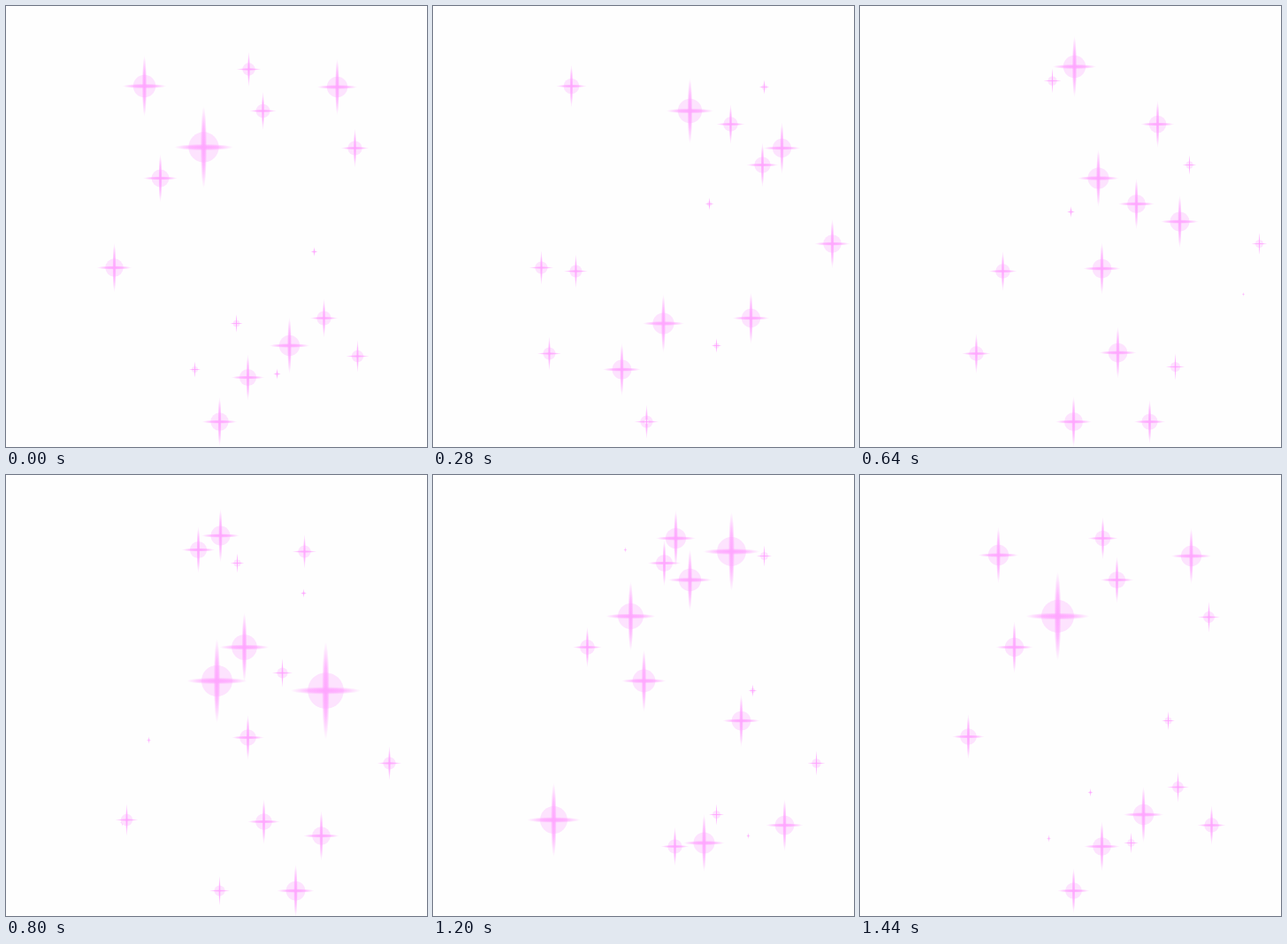
These frames come from a looping animation (476 px wide and 498 px high, 1480 ms). An HTML page without scripts:

```html
<!DOCTYPE html>
<html lang="en">
<head>
<meta charset="utf-8">
<title>Twinkling stars</title>
<style>
  html, body { margin: 0; height: 100%; overflow: hidden; background: #fefefe; }
  svg { display: block; width: 476px; height: 498px; }

  /* --k: turn of the group, 15 turns per loop; --p: half height of a star at its largest */
  use {
    --p: 28;
    animation: twinkle 1480ms calc(var(--k) * 1480ms / 15 - 1750ms) infinite;
  }
  /* half a sine wave, then a rest */
  @keyframes twinkle {
    0% { scale: 0; animation-timing-function: cubic-bezier(.36, .565, .65, 1); }
    24% { scale: calc(var(--p) / 50); animation-timing-function: cubic-bezier(.35, 0, .64, .435); }
    48%, 100% { scale: 0; }
  }
</style>
</head>
<body>
<svg viewBox="-.5 -.5 476 498">
  <defs>
    <radialGradient id="beam">
      <stop offset="0" stop-color="#ffa6ff"/>
      <stop offset=".5" stop-color="#ffa6ff" stop-opacity=".75"/>
      <stop offset="1" stop-color="#ffa6ff" stop-opacity="0"/>
    </radialGradient>
    <g id="star">
      <circle r="19.5" fill="#fde3fe"/>
      <ellipse rx="38" ry="4.2" fill="url(#beam)"/>
      <ellipse rx="4.2" ry="53" fill="url(#beam)"/>
    </g>
  </defs>

  <g style="--k:0">
    <use href="#star" style="translate:156px 90px;--p:35"/>
    <use href="#star" style="translate:122px 295px"/>
    <use href="#star" style="translate:241px 469px"/>
  </g>
  <g style="--k:1">
    <use href="#star" style="translate:394px 160px;--p:30"/>
    <use href="#star" style="translate:359px 352px;--p:30"/>
  </g>
  <g style="--k:2">
    <use href="#star" style="translate:290px 118px;--p:35"/>
    <use href="#star" style="translate:260px 358px;--p:31"/>
    <use href="#star" style="translate:213px 410px"/>
  </g>
  <g style="--k:3">
    <use href="#star" style="translate:372px 179px;--p:26"/>
    <use href="#star" style="translate:451px 268px;--p:29"/>
  </g>
  <g style="--k:4">
    <use href="#star" style="translate:336px 133px;--p:33"/>
    <use href="#star" style="translate:161px 299px"/>
    <use href="#star" style="translate:131px 392px"/>
  </g>
  <g style="--k:5">
    <use href="#star" style="translate:312px 223px"/>
    <use href="#star" style="translate:241px 469px"/>
  </g>
  <g style="--k:6">
    <use href="#star" style="translate:242px 68px;--p:33"/>
    <use href="#star" style="translate:273px 296px"/>
    <use href="#star" style="translate:291px 391px"/>
  </g>
  <g style="--k:7">
    <use href="#star" style="translate:269px 194px;--p:37"/>
    <use href="#star" style="translate:327px 469px"/>
  </g>
  <g style="--k:8">
    <use href="#star" style="translate:217px 84px;--p:26"/>
    <use href="#star" style="translate:361px 243px;--p:55"/>
    <use href="#star" style="translate:356px 407px"/>
  </g>
  <g style="--k:9">
    <use href="#star" style="translate:238px 232px;--p:62"/>
    <use href="#star" style="translate:433px 325px;--p:25"/>
  </g>
  <g style="--k:10">
    <use href="#star" style="translate:261px 99px;--p:29"/>
    <use href="#star" style="translate:337px 86px;--p:50"/>
    <use href="#star" style="translate:136px 389px;--p:47"/>
  </g>
  <g style="--k:11">
    <use href="#star" style="translate:348px 277px"/>
    <use href="#star" style="translate:306px 415px;--p:31"/>
  </g>
  <g style="--k:12">
    <use href="#star" style="translate:274px 71px;--p:31"/>
    <use href="#star" style="translate:290px 118px;--p:34"/>
    <use href="#star" style="translate:397px 395px;--p:29"/>
  </g>
  <g style="--k:13">
    <use href="#star" style="translate:223px 159px;--p:50"/>
    <use href="#star" style="translate:174px 194px;--p:29"/>
    <use href="#star" style="translate:273px 419px"/>
  </g>
  <g style="--k:14">
    <use href="#star" style="translate:374px 91px;--p:30"/>
    <use href="#star" style="translate:320px 383px;--p:30"/>
  </g>
</svg>
</body>
</html>
```
